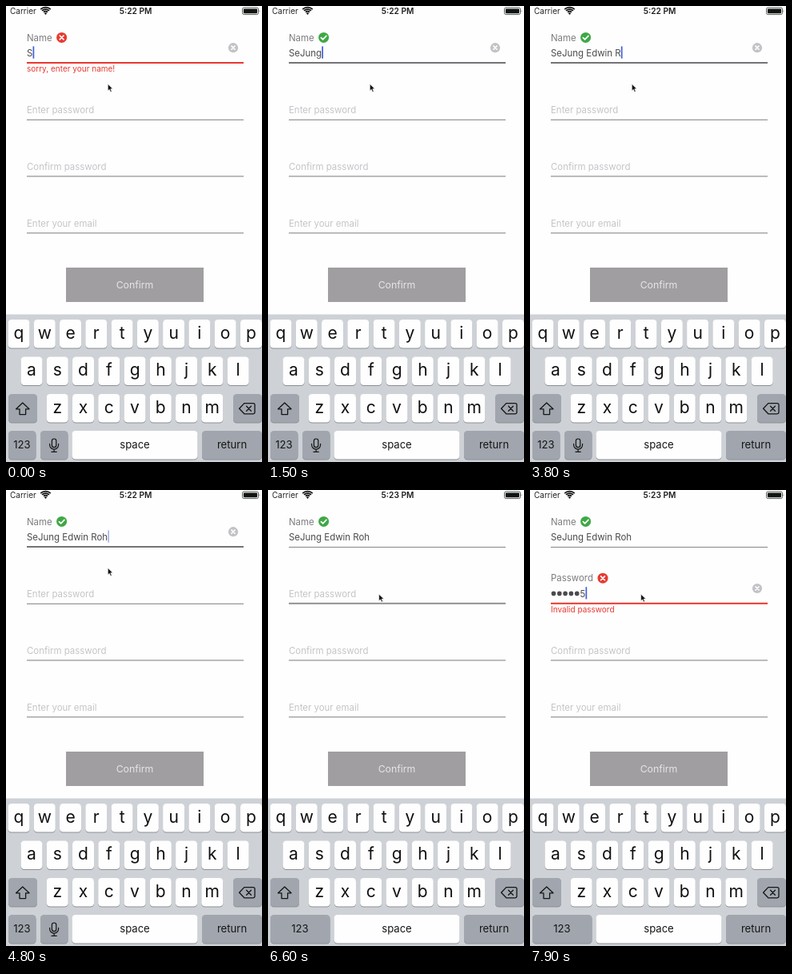
An HTML page that plays this animation: 320x570 px, repeating every 8000 ms.

```html
<!DOCTYPE html>
<html lang="en">
<head>
<meta charset="utf-8">
<title>Sign-up form</title>
<style>
html, body { margin: 0; width: 100%; height: 100%; overflow: hidden; background: #fefefe; }
svg { display: block; width: 100vw; height: 100vh; }
text { font-family: Inter, Roboto, sans-serif; font-size: 11.45px; }
</style>
</head>
<body>
<svg id="stage" viewBox="0 0 320 570" preserveAspectRatio="none"></svg>
<script>
const LOOP = 8000;
const NAME = 'SeJung Edwin Roh';
const PASS = '012345';
const NAME_KEYS = [0, 300, 800, 1000, 1100, 1300, 1800, 2000, 2600, 2700, 3000, 3400, 3600, 3700, 4100, 4190];
const PASS_KEYS = [6890, 7090, 7190, 7390, 7590, 7880];
const FOCUS = 5890;
const LEFT = 26, RIGHT = 297;
const RED = '#e8382f', GREEN = '#3fa846', GREY = '#929095';
const INK = '#4b4a4d', LABEL = '#7d7b7f', HINT = '#c5c4c9';
const stage = document.getElementById('stage');

function add(tag, attrs, parent = stage) {
  const node = document.createElementNS('http://www.w3.org/2000/svg', tag);
  set(node, attrs);
  parent.append(node);
  return node;
}
function set(node, attrs) {
  for (const key in attrs) node.setAttribute(key, attrs[key]);
}
function label(text, x, y, fill, extra = {}, parent = stage) {
  const style = extra.size ? `font-size:${extra.size}px` : '';
  const node = add('text', {
    x, y, fill, style,
    'text-anchor': extra.anchor || 'start',
    'font-weight': extra.weight || 400
  }, parent);
  node.textContent = text;
  return node;
}
function stroke(d, color, width, parent = stage) {
  return add('path', {
    d, fill: 'none', stroke: color, 'stroke-width': width,
    'stroke-linecap': 'round', 'stroke-linejoin': 'round'
  }, parent);
}
function show(node, on) { node.setAttribute('opacity', Number(on)); }
const ramp = (t, start, length) => Math.min(1, Math.max(0, (t - start) / length));
const easeOut = p => 1 - (1 - p) ** 2;
const easeBoth = p => p * p * (3 - 2 * p);

function badge(x, y, r, fill, mark, parent = stage) {
  const g = add('g', { transform: `translate(${x} ${y})` }, parent);
  add('circle', { r, fill }, g);
  stroke(mark, '#fff', 1.7, g);
  return g;
}
const CROSS = 'M-2.4-2.4 2.4 2.4M2.4-2.4-2.4 2.4';
const CHECK = 'M-3.2 .2-1 2.4 3.3-2';

// Status bar
function statusBar() {
  label('Carrier', 5, 10, '#242424', { size: 10 });
  for (const r of [3.8, 6.6, 9.2]) {
    const k = r * 0.68;
    add('path', {
      d: `M${49.5 - k} ${10.6 - k - .3}A${r} ${r} 0 0 1 ${49.5 + k} ${10.6 - k - .3}`,
      fill: 'none', stroke: '#111', 'stroke-width': 1.7
    });
  }
  add('path', { d: 'M49.5 11 47.7 9A2.6 2.6 0 0 1 51.3 9Z', fill: '#111' });
  add('rect', { x: 295.5, y: 2, width: 20, height: 8.6, rx: 2, fill: 'none', stroke: '#4a514c', 'stroke-width': .9 });
  add('rect', { x: 296.9, y: 3.4, width: 17.2, height: 5.8, rx: 1, fill: '#101511' });
  add('path', { d: 'M316.7 4.9Q318.2 6.3 316.7 7.7Z', fill: '#4a514c' });
  return label('', 162, 10, '#1c1c1c', { size: 10.2, weight: 600, anchor: 'middle' });
}

// A text field with floating title, status badge, underline and error line
function field(top, title, hint, error, badgeX) {
  const f = { top };
  f.hint = label(hint, LEFT, top + 63, HINT);
  f.head = add('g', {});
  label(title, LEFT, top + 43.6, LABEL, {}, f.head);
  f.bad = badge(badgeX, top + 39.4, 6.5, RED, CROSS, f.head);
  f.good = badge(badgeX, top + 39.4, 6.5, GREEN, CHECK, f.head);
  f.line = add('rect', { x: LEFT, width: RIGHT - LEFT });
  f.error = label(error, LEFT, top + 82.3, RED, { size: 10 });
  f.clear = badge(284, top + 52.2, 6.1, '#c3c2c7', 'M-2-2 2 2M2-2-2 2');
  f.dots = add('g', { fill: INK });
  f.value = label('', LEFT, top + 62.8, INK);
  f.caret = add('rect', { y: top + 50.4, width: 1.7, height: 15.2, fill: '#4160d8' });
  return f;
}
function underline(f, color, focused) {
  const height = focused ? 2 : 1.2;
  set(f.line, { y: f.top + (focused ? 70 : 70.9), height, fill: color });
}
function placeCaret(f, end, t, last) {
  const since = t - last;
  const fade = (since % 1000) - 500;
  let alpha = 1;
  if (since > 500) {
    alpha = fade > 0 ? 1 - ramp(fade, 0, 200) : ramp(fade + 500, 0, 200);
  }
  set(f.caret, { x: end + .2, opacity: alpha });
}
const typed = (keys, t) => keys.filter(k => k <= t).length;

// Keyboard
function key(x, y, width, fill = '#fefefe') {
  const box = { x, width, height: 35.6, rx: 4.4 };
  add('rect', { ...box, y: y + 1, fill: '#8b8f95' });
  return add('rect', { ...box, y, fill });
}
function keyRow(letters, x, y) {
  [...letters].forEach((c, i) => {
    const left = x + i * 32.27;
    key(left, y, 27);
    label(c, left + 13.5, y + 23.8, '#101010', { size: 21, anchor: 'middle' });
  });
}
function word(text, x, parent = stage) {
  return label(text, x, 553.4, '#151515', { size: 13.1, anchor: 'middle' }, parent);
}
function keyboard() {
  const dark = '#a1a6ae';
  add('rect', { y: 385.5, width: 320, height: 185, fill: '#ced2d7' });
  keyRow('qwertyuiop', 2.5, 392);
  keyRow('asdfghjkl', 18.5, 438.4);
  keyRow('zxcvbnm', 50.7, 485);
  key(3, 485, 36, dark);
  key(284, 485, 36, dark);
  stroke('M20.8 496 12.6 503.8H17V510.6H24.6V503.8H29Z', '#151515', 1.3);
  stroke('M297.8 496.6H309Q311 496.6 311 498.6V507.8Q311 509.8 309 509.8H297.8L291.6 503.2Z', '#151515', 1.3);
  stroke('M300.6 500.2 306.4 506.2M306.4 500.2 300.6 506.2', '#151515', 1.3);
  key(82.5, 531, 157);
  word('space', 161);
  key(245, 531, 75, dark);
  word('return', 282.5);

  const wide = key(3, 531, 74.5, dark);
  const wideShade = wide.previousSibling;
  const numbers = word('123', 20);
  const micKey = key(43, 531, 34.5, dark);
  const micShade = micKey.previousSibling;
  const mic = add('g', {});
  add('rect', { x: 57.4, y: 541, width: 5.4, height: 10.6, rx: 2.7, fill: 'none', stroke: '#151515', 'stroke-width': 1.2 }, mic);
  stroke('M54.6 547.4V548.6A5.5 5.5 0 0 0 65.6 548.6V547.4M60.1 554.2V557.4M57 557.4H63.2', '#151515', 1.2, mic);
  return merged => {
    for (const r of [wide, wideShade]) set(r, { width: merged ? 74.5 : 34.5 });
    for (const n of [micKey, micShade, mic]) show(n, !merged);
    set(numbers, { x: merged ? 40 : 20 });
  };
}

const clock = statusBar();
const name = field(0, 'Name', '', 'sorry, enter your name!', 69.6);
const pass = field(70.8, 'Password', 'Enter password', 'Invalid password', 91);
[['Confirm password', 205, 212.3], ['Enter your email', 275.6, 283.2]].forEach(([text, y, rule]) => {
  label(text, LEFT, y, HINT);
  add('rect', { x: LEFT, y: rule, width: RIGHT - LEFT, height: 1.2, fill: GREY });
});
add('rect', { x: 75, y: 327, width: 172, height: 43, fill: '#a09ea0' });
label('Confirm', 161, 353.4, '#e6e4e6', { size: 12.3, anchor: 'middle' });
const setKeyboard = keyboard();
const pointer = add('path', {
  d: 'M0 0V8.4L2 6.7 3.4 9.8 4.9 9.1 3.5 6.1 6.1 5.9Z',
  fill: '#111', stroke: '#fff', 'stroke-width': .6
});

function drawName(t) {
  const n = typed(NAME_KEYS, t);
  const onName = t < FOCUS;
  const valid = n >= 6;
  name.value.textContent = NAME.slice(0, n).replace(/ /g, '\u00a0');
  show(name.bad, !valid);
  show(name.good, valid);
  show(name.error, valid ? 1 - ramp(t, NAME_KEYS[5], 180) : 1);
  show(name.clear, onName);
  underline(name, !valid ? RED : onName ? '#757377' : GREY, onName);
  if (onName) placeCaret(name, LEFT + name.value.getComputedTextLength(), t, NAME_KEYS[n - 1]);
  else show(name.caret, false);
}

function drawPass(t) {
  const n = typed(PASS_KEYS, t);
  const active = t >= FOCUS;
  const pitch = 7.3;
  const hidden = Math.max(0, n - 1);
  const rise = easeOut(ramp(t, PASS_KEYS[0], 300));
  show(pass.hint, n === 0);
  show(pass.head, rise);
  set(pass.head, { transform: `translate(0 ${12 * (1 - rise)})` });
  show(pass.good, false);
  show(pass.error, rise);
  show(pass.clear, n > 0);
  underline(pass, n ? RED : GREY, active);
  while (pass.dots.childElementCount > hidden) pass.dots.lastChild.remove();
  while (pass.dots.childElementCount < hidden) {
    add('circle', { cx: LEFT + 3.5 + pass.dots.childElementCount * pitch, cy: pass.top + 58.6, r: 2.8 }, pass.dots);
  }
  pass.value.textContent = n ? PASS[n - 1] : '';
  set(pass.value, { x: LEFT + hidden * pitch });
  const end = LEFT + hidden * pitch + (n ? pass.value.getComputedTextLength() : 0);
  if (active) placeCaret(pass, end, t, n ? PASS_KEYS[n - 1] : FOCUS);
  else show(pass.caret, false);
}

function draw(t) {
  const later = t >= FOCUS;
  const move = easeBoth(ramp(t, 5200, 380));
  const nudge = ramp(t, 5650, 100) * .6;
  clock.textContent = later ? '5:23 PM' : '5:22 PM';
  setKeyboard(later);
  drawName(t);
  drawPass(t);
  set(pointer, { transform: `translate(${127.3 + 10.7 * move + nudge} ${97.6 + 32 * move + nudge})` });
}

function tick() {
  draw(performance.now() % LOOP);
  requestAnimationFrame(tick);
}
tick();
</script>
</body>
</html>
```
